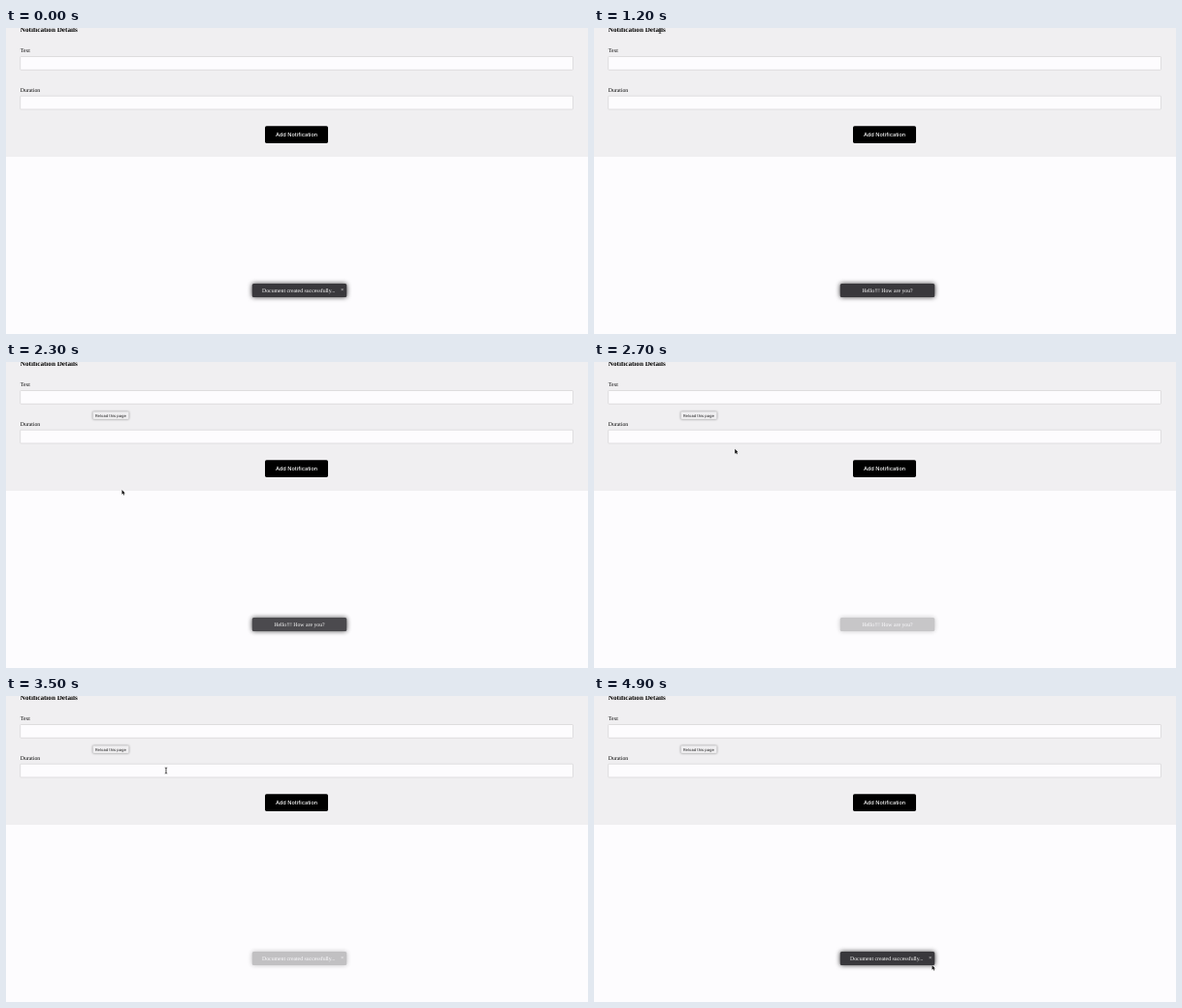
Animation of 600 by 316 pixels, one loop 5000 ms. Source, as an HTML page:

```html
<!DOCTYPE html>
<html lang="en">
<head>
<meta charset="utf-8">
<title>Notification demo</title>
<style>
  html, body { margin: 0; width: 100%; height: 100%; overflow: hidden; background: #fdfcfe; }
  svg { display: block; width: 600px; height: 316px; }
  text { font: 5.75px "Liberation Serif", serif; text-rendering: geometricPrecision; }
  .title { font-size: 7.15px; font-weight: bold; }
  .field { fill: #fdfcfe; stroke: #d4d3d5; stroke-width: .7; }
  .button { font: 500 5.6px Inter, sans-serif; fill: #fff; }
  .tip { font: 4.05px Inter, sans-serif; fill: #222; }
  .middle { text-anchor: middle; }
  #toast rect { fill: #39383c; filter: drop-shadow(0 0 2.4px rgba(0, 0, 0, .8)); }
  #toast text { fill: #fff; }
</style>
</head>
<body>
<svg viewBox="0 0 600 316">
  <g id="page">
    <rect width="600" height="133" fill="#f0eff1"/>
    <text class="title" x="14.8" y="4">Notification Details</text>
    <text x="14.8" y="25.2">Text</text>
    <rect class="field" x="14.7" y="29.5" width="569.8" height="13.8" rx=".6"/>
    <text x="14.8" y="65.9">Duration</text>
    <rect class="field" x="14.7" y="70.2" width="569.8" height="13.8" rx=".6"/>
    <rect x="267" y="101.3" width="65" height="17.6" rx="1.6"/>
    <text class="button middle" x="299.6" y="112.2">Add Notification</text>
    <g id="toast">
      <rect x="253.8" y="264" width="97.4" height="14" rx="1.5"/>
      <text id="message" class="middle" y="272.8"></text>
      <text id="close" class="middle" x="346.5" y="272" font-weight="bold">×</text>
    </g>
  </g>
  <g id="tooltip">
    <rect x="89.6" y="51.3" width="37" height="7.8" rx="1" fill="#f0eff1" stroke="#d0cfd1" stroke-width=".4"
      style="filter: drop-shadow(0 .7px .9px rgba(0, 0, 0, .4))"/>
    <text class="tip middle" x="108" y="56.7">Reload this page</text>
  </g>
  <path id="arrow" d="M0 0V4.8L1.1 3.8 1.8 5.5 2.6 5.2 1.9 3.5H3.3Z" fill="#111" stroke="#fff" stroke-width=".5" paint-order="stroke"/>
  <path id="beam" d="M-1.2-3Q0-3 0-2.2Q0-3 1.2-3M0-2.2V2.2M-1.2 3Q0 3 0 2.2Q0 3 1.2 3" fill="none" stroke="#222" stroke-width=".8"/>
</svg>
<script>
  const LOOP = 5000, STEP = 100;
  const pointerHome = { x: 68, y: 2.5 };
  // The pointer rests between glides and speeds up during each.
  const glides = [
    { from: 1200, to: 1300, x: 89.5, y: 45 },
    { from: 1400, to: 1800, x: 119.5, y: 132 },
    { from: 2300, to: 2800, x: 163.5, y: 60 },
    { from: 2900, to: 3500, x: 165, y: 77 },
    { from: 3500, to: 4100, x: 199.5, y: 151 },
    { from: 4200, to: 4700, x: 338, y: 289 },
    { from: 4700, to: 4900, x: 348.5, y: 278 }
  ];
  const $ = id => document.getElementById(id);
  const show = (id, on) => $(id).style.display = on ? '' : 'none';
  const ramp = (t, from, to) => Math.min(1, Math.max(0, (t - from) / (to - from)));

  function pointerAt(t) {
    return glides.reduce((p, g) => {
      const k = ramp(t, g.from, g.to) ** 2.4;
      return { x: p.x + (g.x - p.x) * k, y: p.y + (g.y - p.y) * k };
    }, pointerHome);
  }

  function isOverText({ x, y }) {
    const inField = top => y > top && y < top + 14;
    return y < 5 || inField(29.5) || inField(70.2);
  }

  function draw(now) {
    const t = Math.floor(now % LOOP / STEP) * STEP;
    const greeting = t >= 500 && t < 2900;
    show('page', t < 300 || t >= 500);
    show('tooltip', t >= 1500);
    show('close', !greeting);
    $('message').textContent = greeting ? 'Hello!!! How are you?' : 'Document created successfully...';
    $('message').setAttribute('x', greeting ? 302.5 : 301.8);
    $('toast').style.opacity = t < 500 ? 1 : greeting ? 1 - ramp(t, 2240, 2870) : ramp(t, 3310, 3940);

    const pointer = pointerAt(t), overText = isOverText(pointer);
    show('beam', t >= 1200 && overText);
    show('arrow', t >= 1200 && !overText);
    $(overText ? 'beam' : 'arrow').setAttribute('transform', `translate(${pointer.x} ${pointer.y})`);
  }

  const start = performance.now();
  function tick() {
    draw(performance.now() - start);
    requestAnimationFrame(tick);
  }
  tick();
</script>
</body>
</html>
```
